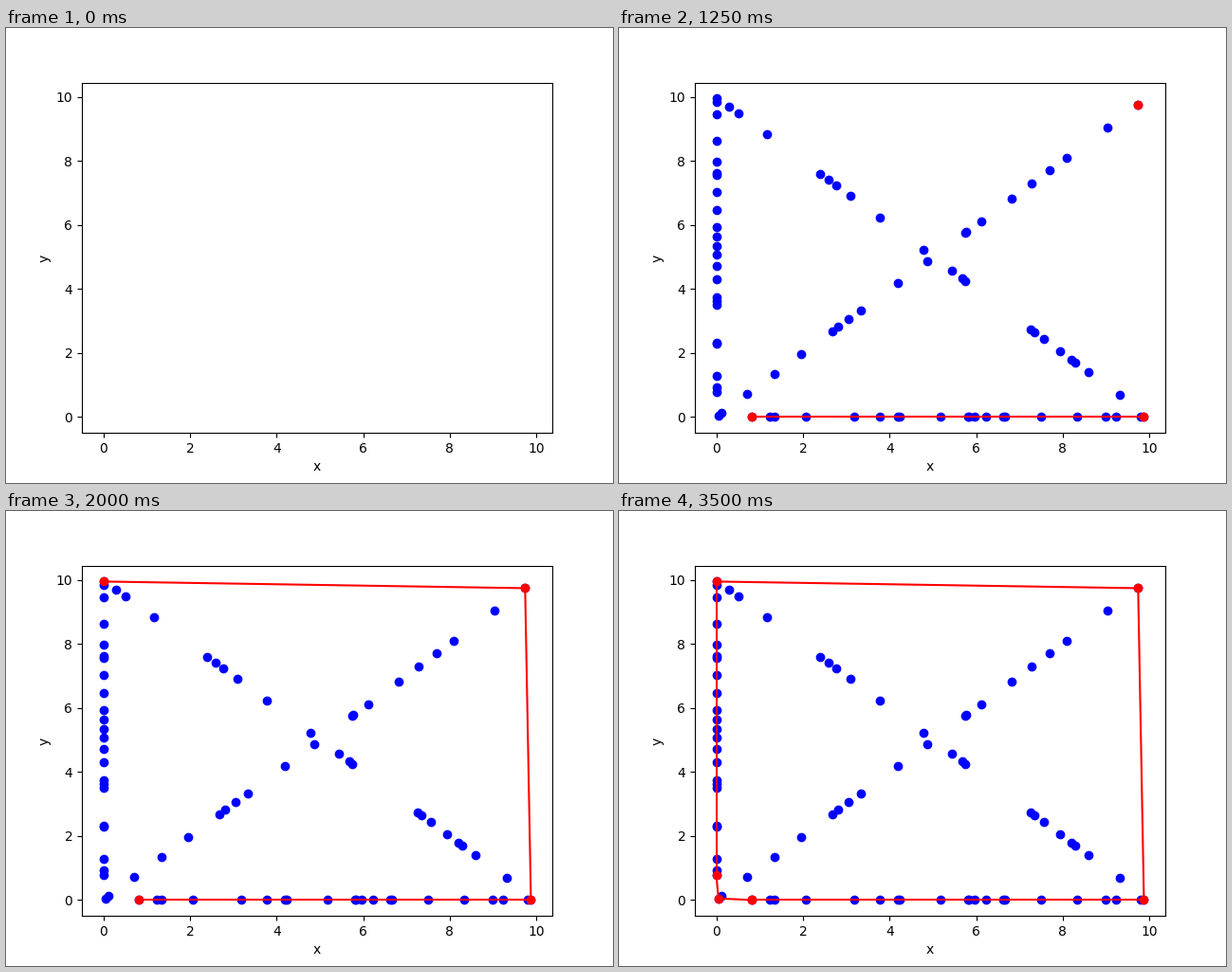
Recreate the animation shown at these times as a matplotlib script. Size 640 by 480 pixels, loop 3750 ms.

```python
import matplotlib.pyplot as plt
from matplotlib.animation import FuncAnimation

SIDE = 10
X_MAX, Y_MAX = 9.873, 9.947
STEP_MS = 250

# Points on the two axes and on the two diagonals of the square
bottom = [0.82, 1.236, 1.345, 2.07, 3.184, 3.775, 4.19, 4.235, 5.18, 5.81,
          5.83, 5.965, 6.23, 6.62, 6.665, 7.5, 8.33, 8.99, 9.23, 9.8, X_MAX]
left = [0.78, 0.93, 1.28, 2.29, 2.32, 3.5, 3.62, 3.74, 4.3, 4.72, 5.07, 5.34,
        5.64, 5.93, 6.46, 7.03, 7.56, 7.62, 7.97, 8.63, 9.45, 9.84, Y_MAX]
rising = [0.05, 0.13, 0.71, 1.34, 1.96, 2.68, 2.81, 3.05, 3.34, 4.19, 4.87,
          5.75, 5.77, 6.12, 6.82, 7.28, 7.7, 8.09, 9.03, 9.739]
falling = [0.295, 0.51, 1.17, 2.4, 2.59, 2.77, 3.1, 3.78, 4.78, 5.44,
           5.68, 5.75, 7.26, 7.35, 7.57, 7.94, 8.2, 8.29, 8.6, 9.32]

points = ([(x, 0) for x in bottom] + [(0, y) for y in left]
          + [(t, t) for t in rising] + [(t, SIDE - t) for t in falling])

# Convex hull, counter-clockwise and closed
hull = [(bottom[0], 0), (X_MAX, 0), (rising[-1], rising[-1]), (0, Y_MAX),
        (0, left[0]), (rising[0], rising[0])]
hull.append(hull[0])

fig, ax = plt.subplots(figsize=(6.4, 4.8), dpi=100)
ax.set_xlim(-0.05 * X_MAX, 1.05 * X_MAX)
ax.set_ylim(-0.05 * Y_MAX, 1.05 * Y_MAX)
ax.set_xlabel("x")
ax.set_ylabel("y")

cloud, = ax.plot(*zip(*points), "o", color="blue")

# Each hull step shows the next vertex, then the edge leading to it
steps = []
for i, vertex in enumerate(hull):
    if i:
        steps += ax.plot(*zip(hull[i - 1], vertex), "-", color="red")
    steps += ax.plot(*vertex, "o", color="red")
# The dot of a new vertex comes before its edge
for i in range(1, len(steps), 2):
    steps[i], steps[i + 1] = steps[i + 1], steps[i]


def draw(frame):
    cloud.set_visible(frame >= 1)
    for i, artist in enumerate(steps):
        artist.set_visible(frame >= i + 2)
    return [cloud, *steps]


anim = FuncAnimation(fig, draw, frames=len(steps) + 2, interval=STEP_MS,
                     init_func=lambda: draw(0), repeat=True, repeat_delay=0)
plt.show()
```
